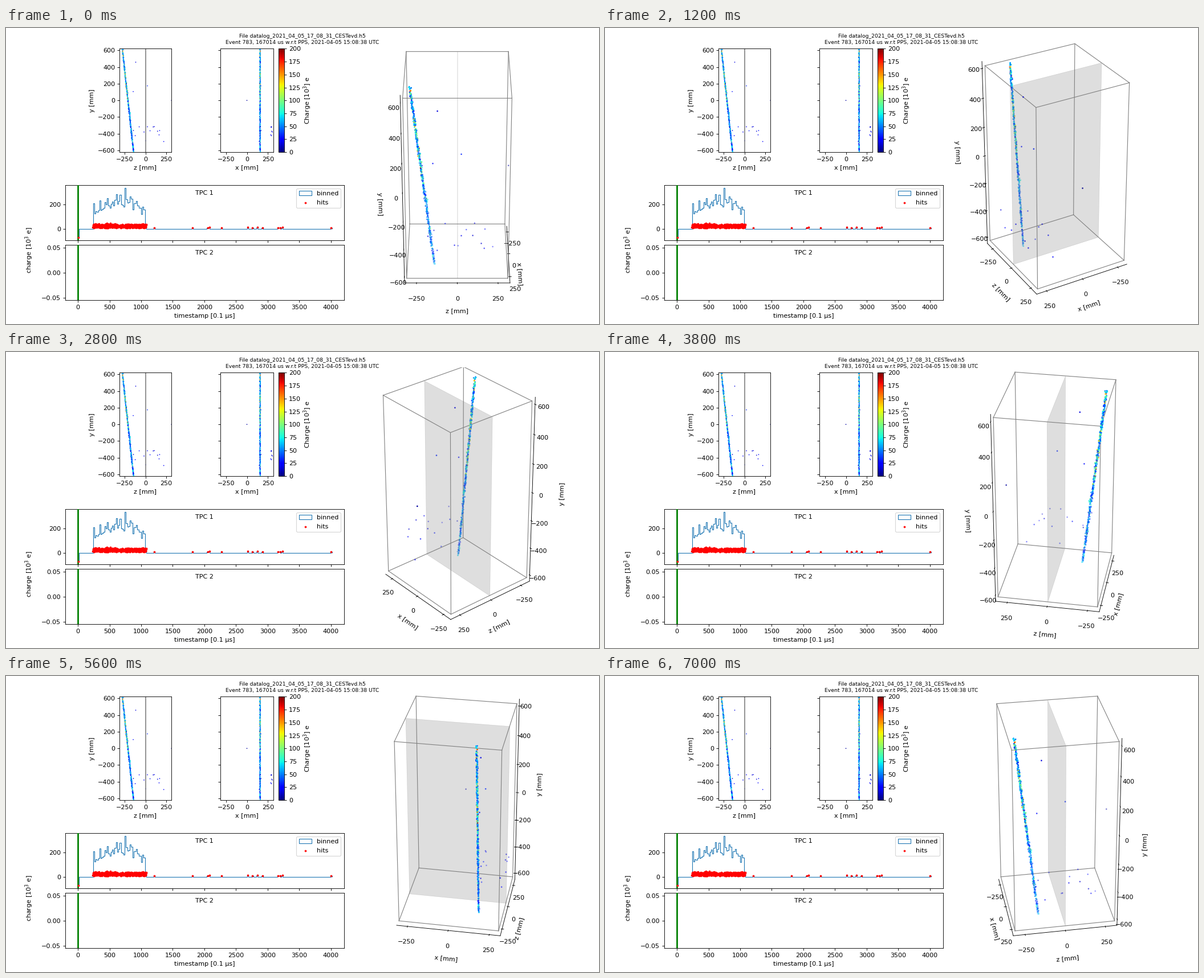
A matplotlib script that plays this animation: 1040 by 520 pixels, repeating every 7.2 s.

```python
import numpy as np
import matplotlib.pyplot as plt
from matplotlib.animation import FuncAnimation
from mpl_toolkits.mplot3d.art3d import Poly3DCollection

W, H, DPI = 1040, 520, 80
FRAMES, INTERVAL = 36, 200
X_MAX, Y_MAX, Z_MAX = 304.3, 620.8, 310.4
TRACK_X = 157

plt.rcParams.update({"font.family": "DejaVu Sans", "font.size": 10})
fig = plt.figure(figsize=(W / DPI, H / DPI), dpi=DPI, facecolor="white")
rng = np.random.default_rng(7)


def box(left, top, right, bottom):
    """Axes rectangle from pixel edges measured from the top left."""
    return [left / W, 1 - bottom / H, (right - left) / W, (bottom - top) / H]


def make_track(count=600):
    """Straight muon track with two short side branches."""
    y = rng.uniform(-Y_MAX, 618, count)
    x = TRACK_X + rng.normal(0, 2, count)
    z = -209 - 0.1078 * y + rng.normal(0, 3, count)
    charge = 18 + rng.gamma(2.6, 16, count) * (1 + 0.2 * np.sign(y))
    for y0, half, dx, dz in ((-165, 28, -8, 14), (108, 12, 5, 10)):
        side = (abs(y - y0) < half) & (rng.random(count) < 0.4)
        x[side] += dx * rng.random(side.sum())
        z[side] += dz * rng.random(side.sum())
        charge[side] += 25
    return x, y, z, charge


def make_strays(count=14):
    """Loose hits low in the volume, plus a few lone ones higher up."""
    x = np.where(np.arange(count) % 2, TRACK_X, 288) + rng.normal(0, 6, count)
    y = -310 - 250 * rng.random(count) ** 2
    z = np.linspace(-147, 225, count) + rng.normal(0, 15, count)
    lone = np.array([(157, 459, -116), (157, 106, -146),
                     (166, 175, 24), (0, 0, 312)]).T
    charge = rng.uniform(12, 32, count + lone.shape[1])
    charge[-1] = 6
    return (*np.hstack([(x, y, z), lone]), charge)


x, y, z, charge = np.hstack([make_track(), make_strays()])
colors = dict(c=charge, cmap="jet", vmin=0, vmax=200)

fig.suptitle("File datalog_2021_04_05_17_08_31_CESTevd.h5\n"
             "Event 783, 167014 us w.r.t PPS, 2021-04-05 15:08:38 UTC",
             fontsize="small")

# side projections
zy = fig.add_axes(box(199, 36.4, 290, 218))
xy = fig.add_axes(box(376, 36.4, 469, 218))
for ax, data, limit, name in ((zy, z, Z_MAX, "z"), (xy, x, 316, "x")):
    dots = ax.scatter(data, y, s=2.2, linewidths=0, **colors)
    ax.set(xlim=(-limit, limit), ylim=(-Y_MAX, Y_MAX), xlabel=f"{name} [mm]",
           xticks=(-250, 0, 250), yticks=range(-600, 601, 200))
zy.axvline(0, color="gray", lw=1.5)
zy.set_ylabel("y [mm]")
xy.tick_params(labelleft=False)
cax = fig.add_axes(box(478, 36.4, 488, 218))
bar = fig.colorbar(dots, cax=cax, ticks=range(0, 201, 25))
bar.set_label("Charge [10$^3$] e", labelpad=2)

# charge over time
tpc1 = fig.add_axes(box(104, 276, 593, 373))
tpc2 = fig.add_axes(box(104, 381.3, 593, 478.4))
late = np.concatenate([[1204, 1808, 2051, 2078, 2268],
                       np.arange(2683, 2920, 78), np.arange(3161, 3240, 38),
                       [4008]])
edges = np.arange(0, 4021, 20)
binned = np.zeros(len(edges) - 1)
binned[0] = -70
binned[late // 20] = 8
step = np.arange(41)
binned[12 + step] = (180 + 45 * np.sin(np.pi * step / 40)
                     + rng.normal(0, 38, len(step))).clip(100, 280)
binned[12 + 25] = 335
binned[12 + 41] = 30
pulse_hits = 560
hit_t = np.concatenate([rng.uniform(235, 1085, pulse_hits), late, [8]])
hit_q = np.concatenate([6 + 26 * rng.random(pulse_hits)
                        + rng.exponential(3, pulse_hits),
                        rng.uniform(6, 11, len(late)), [-70]])
tpc1.hist(edges[:-1], edges, weights=binned, histtype="step", color="C0",
          label="binned")
tpc1.scatter(hit_t, hit_q, s=11, color="red", linewidths=0, zorder=5,
             label="hits")
tpc1.set(ylim=(-95, 356), yticks=(0, 200))
tpc1.legend(loc="upper right")
tpc2.set(ylim=(-0.055, 0.055), yticks=(-0.05, 0, 0.05),
         xlabel="timestamp [0.1 µs]")
for ax, name in ((tpc1, "TPC 1"), (tpc2, "TPC 2")):
    ax.axvline(0, color="green", lw=2.5, zorder=4)
    ax.set(xlim=(-200, 4211), xticks=range(0, 4001, 500))
    ax.text(0.498, 0.86, name, transform=ax.transAxes, ha="center",
            va="center")
fig.text(41 / W, 1 - 390 / H, "charge [10$^3$ e]", rotation=90,
         ha="center", va="center")

# rotating detector volume
view = fig.add_axes(box(564.5, 26.5, 1006.5, 468.5), projection="3d",
                    facecolor="none")
MARGIN = 25 / 24
view.set_box_aspect((1, 1, 2))
view.set(xlim=(-X_MAX * MARGIN, X_MAX * MARGIN),
         ylim=(-Z_MAX * MARGIN, Z_MAX * MARGIN),
         zlim=(-Y_MAX * MARGIN, Y_MAX * MARGIN),
         xticks=(-250, 0, 250), yticks=(-250, 0, 250),
         zticks=range(-600, 601, 200), xlabel="x [mm]", ylabel="z [mm]")
view.set_zlabel("y [mm]", labelpad=20)
view.grid(False)
for axis in (view.xaxis, view.yaxis, view.zaxis):
    axis.set_pane_color((1, 1, 1, 0))

size = np.array([X_MAX, Z_MAX, Y_MAX])
for k in range(3):
    for a in (-1, 1):
        for b in (-1, 1):
            ends = np.insert(np.array([[a, b], [a, b]]), k, [-1, 1], axis=1)
            view.plot(*(ends * size).T, color="gray", lw=1)
cathode = [(sx * X_MAX, 0, sy * Y_MAX)
           for sx, sy in ((-1, -1), (1, -1), (1, 1), (-1, 1))]
gray = (0.5, 0.5, 0.5, 0.26)
view.add_collection3d(Poly3DCollection([cathode], facecolors=[gray],
                                       edgecolors=[gray], linewidths=0.6))
view.scatter(x, z, y, s=1, linewidths=1.4, **colors)


def update(frame):
    # the tiny offset keeps axis placement stable when seen edge-on
    view.view_init(elev=30, azim=frame * 360 / FRAMES + 0.01)
    return ()


anim = FuncAnimation(fig, update, frames=FRAMES, interval=INTERVAL,
                     init_func=lambda: update(0), repeat=True, repeat_delay=0)
plt.show()
```
